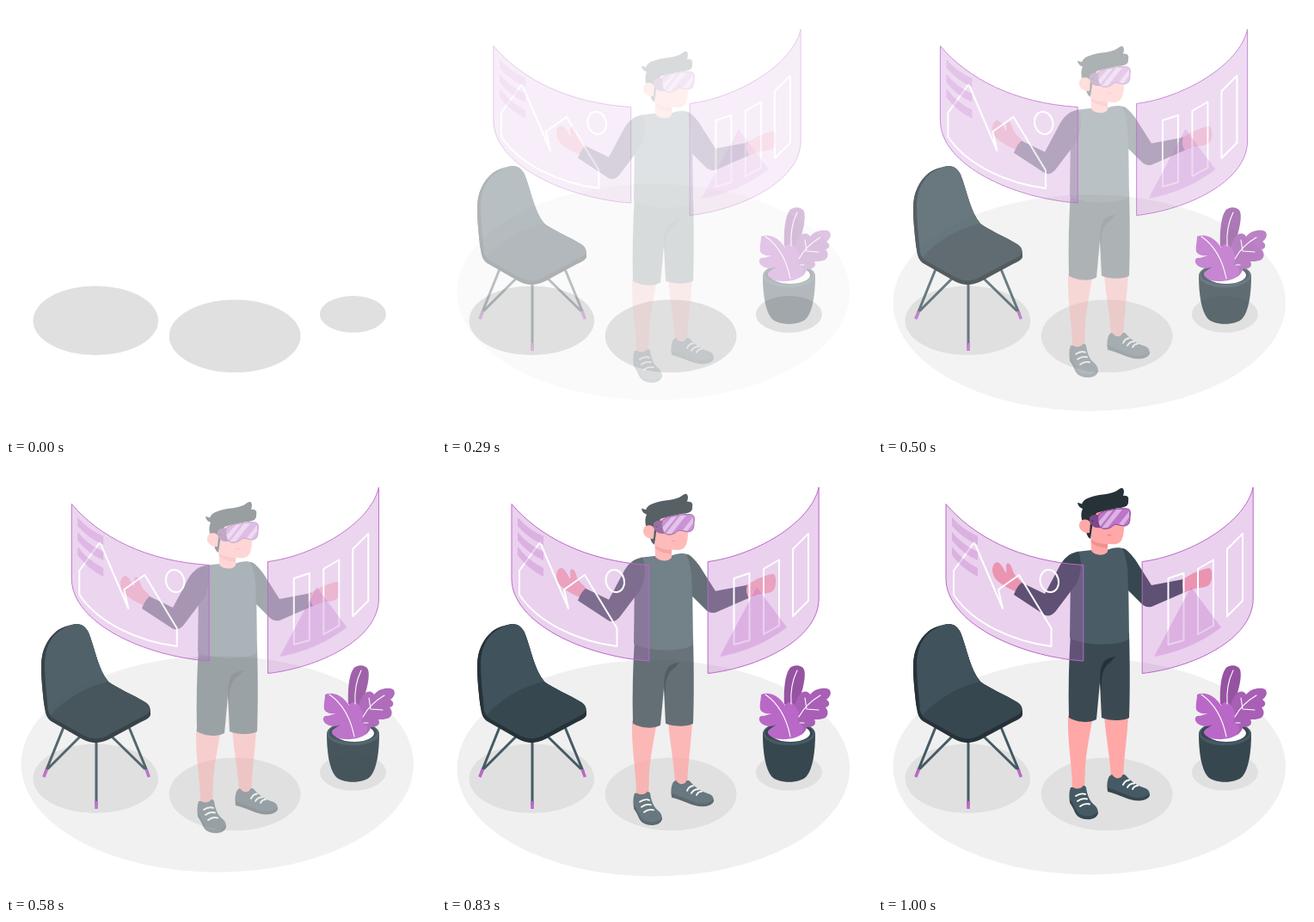
Animation of 500 by 500 pixels, one loop 1.04 s. Source, as an HTML page:

```html
<!DOCTYPE html>
<html lang="en">
<head>
<meta charset="utf-8">
<title>Virtual reality</title>
<style>
  html, body { margin: 0; width: 100%; height: 100%; overflow: hidden; background: #fff; }
  svg { display: block; width: 100%; height: 100%; }
  .line { fill: none; stroke-linecap: round; stroke-linejoin: round; }
  .white { stroke: #fff; }
</style>
</head>
<body>
<svg viewBox="0 0 500 500">
  <ellipse id="floor" cx="245.800" cy="351.700" rx="228.200" ry="125.800" fill="#f0f0f0"/>

  <g fill="#e0e0e0">
    <ellipse cx="104.300" cy="365.800" rx="72.800" ry="40.300"/>
    <ellipse cx="266.100" cy="383.800" rx="76.400" ry="42.300"/>
    <ellipse cx="403.400" cy="358.400" rx="38.500" ry="21.400"/>
  </g>

  <g id="chair">
    <g class="line" stroke="#455a64" stroke-width="3">
      <path d="M67 306L46 358M87 316L49 354M105 322V396M122 316L161 354M143 306L164 357"/>
    </g>
    <path d="M47.500 355L43.800 364M105 392V401M163 355L166.300 364" class="line" style="stroke-linecap:butt" stroke="#ba68c8" stroke-width="3.600"/>
    <path d="M41 236C41 217 47 204 59 194C66 189 75 187 81 186C89 186 93 190 96 196C104 216 107 239 119 253C128 260 149 269 162 277C168 281 168 285 168 291C168 295 163 297 157 300L120 320C109 325.500 99 325.500 89 320L54 300C47 296 46 291 44.500 281C43 268 41 251 41 236Z" fill="#263238"/>
    <path d="M45 234C45 217 50 204 61 195C68 190 75 187 81 186C89 186 93 190 96 196C104 216 107 239 119 253C128 260 149 269 162 277C168 281 169 287 164 291L119 315C109 321 100 320 91 316L57 297C50 293 49 289 48.500 282C47 266 45 251 45 234Z" fill="#37474f"/>
    <path d="M45 234C45 217 50 204 61 195C68 190 75 187 81 186C89 186 93 190 96 196C104 216 107 239 119 253C92 259 69 273 52 292C49 288 49 286 48.500 282C47 266 45 251 45 234Z" fill="#40525c"/>
    <path d="M45 232C45 220 46 214 49 208L47 210C42 218 41 227 41 236C41 251 43 268 44.500 281L48.500 283C47 266 45 251 45 232Z" fill="#263238"/>
  </g>

  <g id="plant">
    <path d="M373 313C373 336 376 354 383 363C390 372 417 372 424 363C431 354 434 336 434 313Z" fill="#37474f"/>
    <ellipse cx="403.500" cy="313.500" rx="30.500" ry="13.800" fill="#455a64"/>
    <ellipse cx="403.500" cy="312.500" rx="28" ry="11" fill="#37474f"/>
    <ellipse cx="405" cy="313" rx="23" ry="10" fill="#fff"/>
    <path d="M398 279C397 262 399 245 404 238C408 233 418 233 421 239C424 248 418 270 410 288Z" fill="#9653a1"/>
    <path d="M407 301C408 285 411 273 417 267C421 263 426 264 428 268C433 261 445 259 450 262C454 266 451 271 447 274C452 277 451 282 446 283C451 289 448 295 443 296C440 297 437 297 433 297C436 303 432 306 424 306C423 312 418 316 411 317Z" fill="#a85fb5"/>
    <path d="M371 268C380 264 392 269 399 281C401 276 406 276 409 279C414 286 417 290 414 298C412 302 418 302 420 305C421 310 418 316 411 318C402 321 388 321 383 317C377 313 378 310 383 307L389 303C381 307 373 304 370 300C367 296 370 292 374 293L384 290C377 291 371 289 370 285C369 280 371 274 371 268Z" fill="#ba68c8"/>
    <g class="line white" stroke-width="1.100">
      <path d="M406 279C405 264 408 250 413 240M376 268C392 279 401 297 405 317M415 294C421 283 428 276 440 269M422 272L424 285L438 286M416 301H421"/>
    </g>
  </g>

  <g id="man">
    <!-- legs and shoes -->
    <g fill="#ffa8a7">
      <path d="M221 292H250C247 311 243 329 241 351L240 380Q233 386 226 379C226 351 220 324 221 292Z"/>
      <path d="M263 292H291C290 314 287 335 286 350L285 366Q278 372 271 365C270 341 265 319 263 292Z"/>
    </g>
    <path d="M224 376C222 381 222 388 223 393C227 397 228 403 231 408C235 414 251 414 255 408C257 404 255 399 251 396C245 391 243 383 242 376C240 373 238 374 237 376Q231 379 227 376Z" fill="#455a64"/>
    <path d="M223 390C228 395 229 402 233 406C239 411 250 411 256 404C256 409 253 412 247 413C239 414 232 411 229 405C227 400 225 397 223 394Z" fill="#37474f"/>
    <path d="M269 363C266 368 266 376 267 380C275 383 285 386 294 390C302 392 311 391 315 387C317 382 315 379 311 377C301 374 294 369 288 362C286 360 284 361 283 364Q277 368 272 361Z" fill="#455a64"/>
    <path d="M267 376C276 379 285 383 295 387C303 389 311 388 316 383C317 388 311 391 304 391.500C292 392 280 384 267 381Z" fill="#37474f"/>
    <g class="line white" stroke-width="1.900">
      <path d="M230 386Q236 382 241 384M232 392Q237 388 243 389.500M235 398Q240 394 246 395.500M285 373Q287 368 292 367.500M290 376Q293 371 298 371.500M296 378Q298 374 302 374"/>
    </g>

    <!-- shorts -->
    <path d="M224 196H292C293 232 293 267 292 295C286 299 269 299 260 295L258 254L254 297C245 302 230 300 222 295C221 262 222 228 224 196Z" fill="#3b4a52"/>
    <path d="M276 224C269 225 263 227 261 233C257 241 258 253 260 266C260 254 259 245 264 237C267 232 272 230 276 224Z" fill="#263238"/>

    <!-- hands -->
    <path d="M163 149C153 146 143 140 137 134C133 129 132 122 134 118C136 114 139 113 142 116C145 119 147 124 149 127C150 122 148 117 150 116C153 114 155 118 157 125C159 130 163 133 168 138Z" fill="#ffa8a7"/>
    <path d="M353 134C360 132 363 128 369 126C374 124 382 121 385 121C389 122 389 133 387 137C386 142 379 144 373 144C366 145 363 147 354 150Z" fill="#ffa8a7"/>

    <!-- torso and sleeves -->
    <path d="M231 102C237 101 243 101 249 100H266C273 97 281 96 287 99C291 104 292 113 291 124L292 203C281 213 235 211 223 202L224 128C224 115 226 107 231 102Z" fill="#4a5d66"/>
    <path d="M233 102C222 103 215 111 210 121L194 151L167 138C162 142 160 147 158 152L193 175C198 178 202 176 206 172L231 139C236 128 238 113 233 102Z" fill="#37474f"/>
    <path d="M284 98C290 99 294 105 299 111L318 141L355 134C353 139 354 145 357 149L318 166C312 167 309 165 306 162L291 147C290 131 292 115 284 98Z" fill="#37474f"/>

    <!-- head -->
    <path d="M247 76L248 101C252 107 264 107 267 102V84Z" fill="#ffa8a7"/>
    <path d="M248 88C254 92 260 93 267 93V98C258 97 252 95 248 91Z" fill="#f28f8f"/>
    <path d="M246 55H285L286 73C286 85 283 92 277 93C265 94 252 91 248 82Z" fill="#ffa8a7"/>
    <path d="M238 52C235 46 239 41 246 39C256 35 267 36 276 32C280 30 281 28 284 28C287 30 286 34 285 37C291 36 292 40 291 43C292 49 286 51 280 51C270 53 260 55 254 57L250 66L247 87C243 85 242 80 242 74L237 65C236 60 236 56 238 52Z" fill="#263238"/>
    <path d="M232 45C234 45 236 46 238 47L242 53C236 52 233 50 232 45Z" fill="#263238"/>
    <path d="M247 68C243 62 235 64 234 70C233 76 239 81 246 80Z" fill="#ffa8a7"/>
    <path d="M267 83Q269 81 271 83" class="line" stroke="#e87f80" stroke-width="1"/>
    <!-- headset -->
    <path d="M246 62C249 58 254 59 257 59L259 74C252 75 247 72 246 66Z" fill="#7d4788"/>
    <path d="M257 58C264 53 281 51 289 52C293 52 294 55 293 61C293 68 292 71 287 72C281 72 277 69 274 71C270 75 266 76 261 75C256 73 254 62 257 58Z" fill="#bd74ca" stroke="#82468e" stroke-width="1"/>
    <path d="M260 74.500L277 53H284L267 74ZM256.500 67L267 55L273 54L258 73ZM280 70L292 55V62L285 71.500Z" fill="#fff" opacity=".45"/>
    <circle cx="249.500" cy="66" r="1.100" fill="#37474f"/>
  </g>

  <g id="panels">
    <g fill="#ba68c8" fill-opacity=".3" stroke="#ba68c8" stroke-width="1">
      <path d="M79 46.500C110.600 84 164.600 113 238.800 117.500V229C164.600 224 79 185 79 133Z"/>
      <path d="M307.200 113.500C359.600 107 426.600 70 436.200 27V157C435.600 205 364.600 237 307.200 243.500Z"/>
    </g>
    <g class="line white" stroke-width="2">
      <path d="M88 124L112 91L145 168L140 146L164 129L201.500 191V212C156 206 110 185 88 152Z"/>
      <ellipse cx="199.300" cy="136" rx="10.600" ry="13.200" transform="rotate(-14 199.300 136)"/>
      <path d="M337.500 133L355.500 127V205L337.500 210Z"/>
      <path d="M372 122L390 111.500V188L372 198Z"/>
      <path d="M406 99L424 81V159L406 177Z"/>
    </g>
    <g fill="#ba68c8" fill-opacity=".3">
      <path d="M86 62Q98 76 116 84V94Q98 86 86 72Z"/>
      <path d="M86 79Q98 94 116 102V112Q98 104 86 89Z"/>
      <path d="M86 96Q98 112 116 121V131Q98 122 86 106Z"/>
      <path d="M364 143L399 190Q365 216 321 224Z"/>
    </g>
  </g>
</svg>
<script>
const LOOP = 1040, STEPS = 25, STEP_MS = 1000 / 24, TRAVEL = 30;
const part = id => document.getElementById(id);
const [ground, chair, plant, man, panels] = ['floor', 'chair', 'plant', 'man', 'panels'].map(part);

// CSS-style cubic Bézier easing, solved by bisection
function bezier(x1, y1, x2, y2) {
  const at = (a, b, s) => 3 * (1 - s) ** 2 * s * a + 3 * (1 - s) * s * s * b + s ** 3;
  return x => {
    if (x <= 0 || x >= 1) return x <= 0 ? 0 : 1;
    let low = 0, high = 1;
    for (let i = 0; i < 30; i++) {
      const mid = (low + high) / 2;
      if (at(x1, x2, mid) < x) low = mid; else high = mid;
    }
    return at(y1, y2, low);
  };
}
const overshoot = bezier(.36, -.01, .5, 1.38);
const easeIn = bezier(.34, 0, 1, 1);

function place(el, amount, dx, dy) {
  const away = TRAVEL * (1 - amount);
  el.setAttribute('opacity', Math.max(0, Math.min(1, amount)));
  el.setAttribute('transform', `translate(${dx * away} ${dy * away})`);
}

function draw(ms) {
  const step = Math.min(STEPS - 1, Math.floor((ms % LOOP + 4) / STEP_MS));
  const progress = step < 3 ? 0 : (step + 1) / STEPS;
  const springy = overshoot(progress);
  place(ground, springy, 0, -1);
  place(chair, springy, 0, 0);
  place(plant, springy, 0, 0);
  place(man, easeIn(progress), 0, 1);
  place(panels, springy, -1, 0);
}

const start = performance.now();
function tick() {
  draw(performance.now() - start);
  requestAnimationFrame(tick);
}
tick();
</script>
</body>
</html>
```
